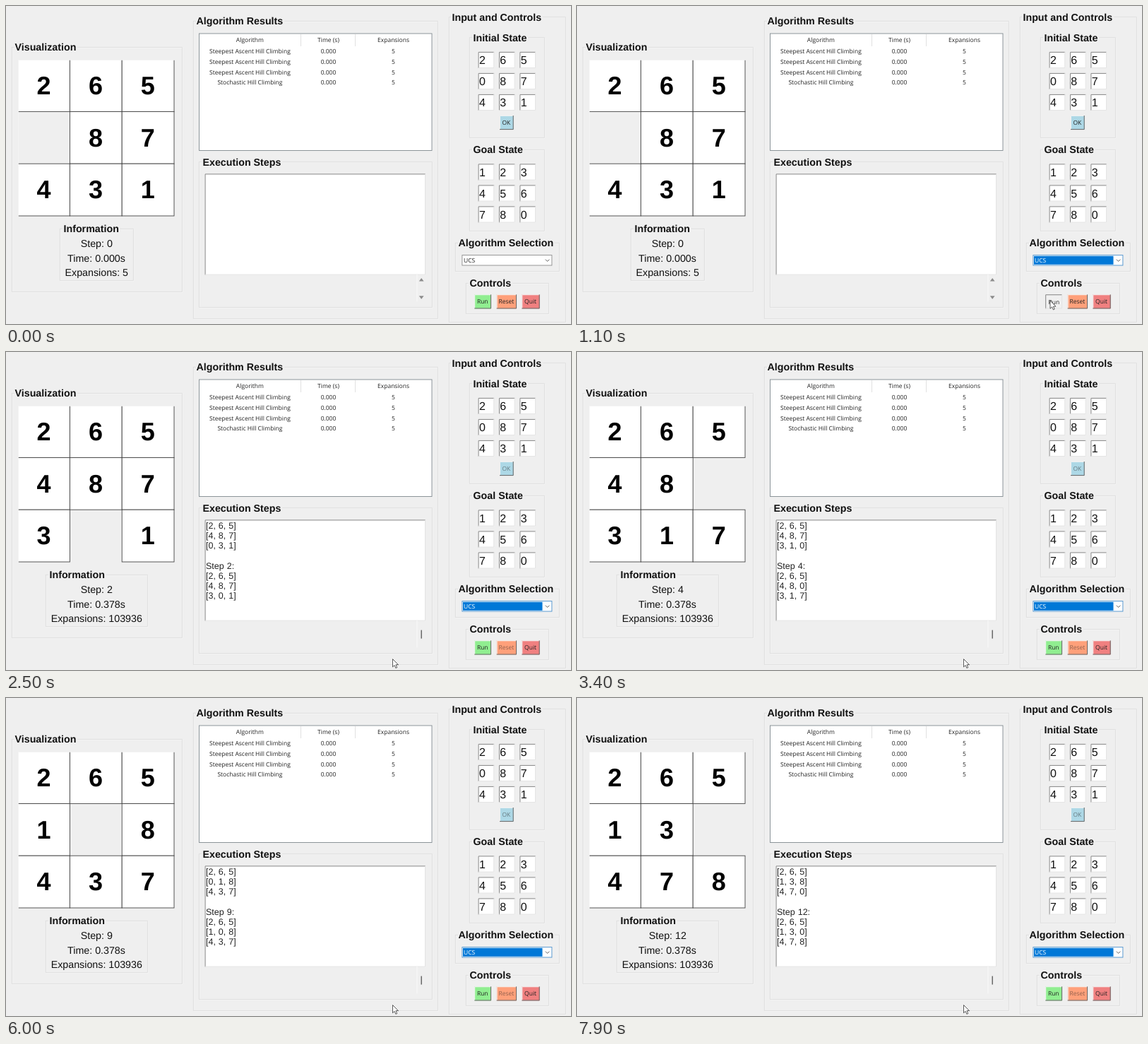
An HTML page that plays this animation: 800x450 px, repeating every 8000 ms.

```html
<!DOCTYPE html>
<html lang="en">
<head>
<meta charset="utf-8">
<title>8-puzzle solver</title>
<style>
html, body { margin: 0; width: 800px; height: 450px; overflow: hidden; background: #efefef; }
svg { display: block; font-family: "Liberation Sans", Arial, sans-serif; fill: #111; text-rendering: geometricPrecision; }
text { white-space: pre; }
.title { font-size: 14.25px; font-weight: bold; stroke: #efefef; stroke-width: 5px; paint-order: stroke; }
.info { font-size: 14.25px; text-anchor: middle; }
.tile { font-size: 36px; font-weight: bold; text-anchor: middle; fill: #000; }
.entry { font-size: 16px; }
.log { font-size: 12.5px; word-spacing: .5px; fill: #222; }
.ui { font-family: "Open Sans", "Noto Sans", sans-serif; font-size: 8.5px; fill: #222; }
.mid { text-anchor: middle; }
</style>
</head>
<body>
<svg width="800" height="450" viewBox="0 0 800 450">
  <defs><clipPath id="board"><rect x="17" y="76" width="222" height="222"/></clipPath></defs>
  <g id="fixed"></g>
  <g id="live"></g>
  <path id="cursor" d="M0 0V11.2L2.6 8.8L4.4 12.8L6.2 12L4.5 8.1H8Z" fill="#fff" stroke="#333" stroke-width=".8"/>
</svg>
<script>
const LOOP = 8000, FRAME = 100;
const FIRST_STEP = 1330, STEP_TIME = 515;
const START = "265087431", GOAL = "123456780";
const MOVES = "DRRULDLURDRU";
const OFFSET = { U: -3, D: 3, L: -1, R: 1 };
// time, x, y of the pointer tip
const POINTER = [[100, 663, 384], [600, 670, 417], [1200, 670, 417],
  [1700, 554.5, 433], [2000, 554.5, 433], [2400, 547.5, 434.5]];

const $ = id => document.getElementById(id);
const text = (cls, x, y, str) => `<text class="${cls}" x="${x}" y="${y}">${str}</text>`;
const rect = (x, y, w, h, fill, extra = "") =>
  `<rect x="${x}" y="${y}" width="${w}" height="${h}" fill="${fill}" ${extra}/>`;
const line = (d, stroke, width = 1) =>
  `<path d="${d}" fill="none" stroke="${stroke}" stroke-width="${width}"/>`;

function group(label, x, y, x2, y2, labelX) {
  return rect(x + 1, y + 1, x2 - x, y2 - y, "none", 'stroke="#f8f8f8" stroke-width=".7"') +
    rect(x + .3, y + .3, x2 - x, y2 - y, "none", 'stroke="#dadada" stroke-width=".8"') +
    text("title", labelX, y + 5.3, label);
}

function bevel(x, y, w, h, fill, topLeft, bottomRight) {
  return rect(x, y, w, h, fill) +
    line(`M${x + .4} ${y + h}V${y + .4}H${x + w}`, topLeft) +
    line(`M${x} ${y + h - .4}H${x + w - .4}V${y}`, bottomRight);
}
const sunken = (x, y, w, h, fill = "#fff") => bevel(x, y, w, h, fill, "#858585", "#e2e2e2");

function button(label, x, y, w, color, disabled, pressed) {
  const face = pressed ? sunken(x, y, w, 20, "#f0f0f0") : bevel(x, y, w, 20, color, "#f4f4f4", "#666");
  const shift = pressed ? .7 : 0;
  return face + `<g opacity="${disabled ? .5 : 1}">` +
    text("ui mid", x + w / 2 - .4 + shift, y + 13 + shift, label) + "</g>";
}

function entries(state, top) {
  return [...state].map((digit, i) => {
    const x = 668.7 + i % 3 * 29.4, y = top + Math.floor(i / 3) * 30;
    return sunken(x, y, 22.5, 23) + text("entry", x + 1.2, y + 17, digit);
  }).join("");
}

function table() {
  const columns = [345.4, 456.5, 548.5];
  const steepest = "Steepest Ascent Hill Climbing";
  const rows = [["Algorithm", "Time (s)", "Expansions"],
    ...[steepest, steepest, steepest, "Stochastic Hill Climbing"].map(name => [name, "0.000", "5"])];
  return rect(273.5, 39, 329.5, 165.5, "#fff", 'stroke="#808a90" stroke-width=".9"') +
    line("M417.5 40V57M494.5 40V57", "#ddd", .9) +
    rows.map((row, r) => row.map((cell, c) =>
      text("ui mid", columns[c], r ? 52.4 + r * 14.7 : 51, cell)).join("")).join("");
}

$("fixed").innerHTML =
  group("Visualization", 8, 58, 249, 404, 12.5) +
  group("Algorithm Results", 265, 21, 611, 442, 269.5) +
  group("Execution Steps", 273, 220.5, 603, 426, 278.5) +
  group("Input and Controls", 627, 15.5, 792, 447, 631.5) +
  group("Initial State", 656, 44.5, 762, 186, 661.5) +
  group("Goal State", 656, 203, 762, 318, 661.5) +
  group("Algorithm Selection", 636, 335, 783, 375, 640.5) +
  group("Controls", 651, 392, 768, 435, 656.5) +
  table() + sunken(281.7, 237.5, 312.3, 143) +
  line("M582 380V418", "#fafafa") +
  entries(START, 65) + entries(GOAL, 223.5);

// every board on the way, one per step
const boards = [START];
for (const move of MOVES) {
  const cells = [...boards[boards.length - 1]];
  const from = cells.indexOf("0"), to = from + OFFSET[move];
  [cells[from], cells[to]] = [cells[to], "0"];
  boards.push(cells.join(""));
}

function board(state) {
  const cells = [...state].map((digit, i) => {
    if (digit === "0") return "";
    const col = i % 3, row = Math.floor(i / 3);
    return rect(16.6 + col * 73.8, 75.6 + row * 73.8, 73.8, 73.8, "#fff", 'stroke="#444" stroke-width=".9"') +
      text("tile", 53.4 + col * 73.7, 125 + row * 73.7, digit);
  });
  return `<g clip-path="url(#board)">${cells.join("")}${line("M17 298V76H239", "#f4f4f4", 1.6)}</g>`;
}

function log(step) {
  const lines = boards.slice(0, step + 1).flatMap((state, i) =>
    [`Step ${i}:`, ...state.match(/.../g).map(row => `[${[...row].join(", ")}]`), ""]);
  lines.push("");
  return lines.slice(-10).map((str, i) => text("log", 283, 250.3 + i * 14.05, str)).join("");
}

function info(step) {
  const solved = step >= 0, x = solved ? 56 : 76;
  return group("Information", x, 315, solved ? 200 : 180, 388, x + 5.5) +
    text("info", 128.3, 341, `Step: ${Math.max(step, 0)}`) +
    text("info", 128, 361.7, `Time: ${solved ? "0.378" : "0.000"}s`) +
    text("info", 128.3, 382.3, `Expansions: ${solved ? 103936 : 5}`);
}

function scrollbar(step) {
  return step > 0 ? line("M588.2 393.5V405.5", "#555", 1.3)
    : '<path d="M584.8 389.5L588.2 385L591.6 389.5ZM584.8 410.3L588.2 414.8L591.6 410.3Z" fill="#8c8c8c"/>';
}

function combo(selected) {
  return rect(645.9, 352.6, 127, 14.4, "#fff", `stroke="${selected ? "#4a90cc" : "#8c8c8c"}" stroke-width=".9"`) +
    (selected ? rect(647, 353.8, 112.5, 12, "#0078d7") : "") +
    `<text class="ui" x="648" y="363" style="fill:${selected ? "#fff" : "#222"}">UCS</text>` +
    line("M763.8 358.6L766.6 361.4L769.4 358.6", "#555", .9);
}

let shown = "";
function draw(t) {
  const step = t < FIRST_STEP ? -1 : Math.min(Math.floor((t - FIRST_STEP) / STEP_TIME), MOVES.length);
  const selected = t >= 100, pressed = t >= 800 && step < 0, running = step >= 0;
  const key = [step, selected, pressed].join();
  if (key !== shown) {
    shown = key;
    $("live").innerHTML = board(boards[Math.max(step, 0)]) + info(step) +
      log(step) + scrollbar(step) + combo(selected) +
      button("OK", 699, 155, 19.6, "#add8e6", running) +
      button("Run", 663.3, 408.3, 23.7, "#90ee90", false, pressed) +
      button("Reset", 694.7, 408.3, 28.3, "#ffa07a", running) +
      button("Quit", 730.4, 408.3, 25.2, "#f08080");
  }
  movePointer(t);
}

function movePointer(t) {
  const next = POINTER.findIndex(p => p[0] > t);
  const b = POINTER[next < 0 ? POINTER.length - 1 : next], a = next > 0 ? POINTER[next - 1] : b;
  const part = a === b ? 0 : (t - a[0]) / (b[0] - a[0]);
  const ease = part * part * (3 - 2 * part);
  const x = a[1] + (b[1] - a[1]) * ease, y = a[2] + (b[2] - a[2]) * ease;
  $("cursor").setAttribute("transform", `translate(${x} ${y})`);
  $("cursor").setAttribute("visibility", t < 100 ? "hidden" : "visible");
}

const begin = performance.now();
function tick() {
  const t = (performance.now() - begin) % LOOP;
  draw(Math.floor(t / FRAME) * FRAME);
  requestAnimationFrame(tick);
}
tick();
</script>
</body>
</html>
```
